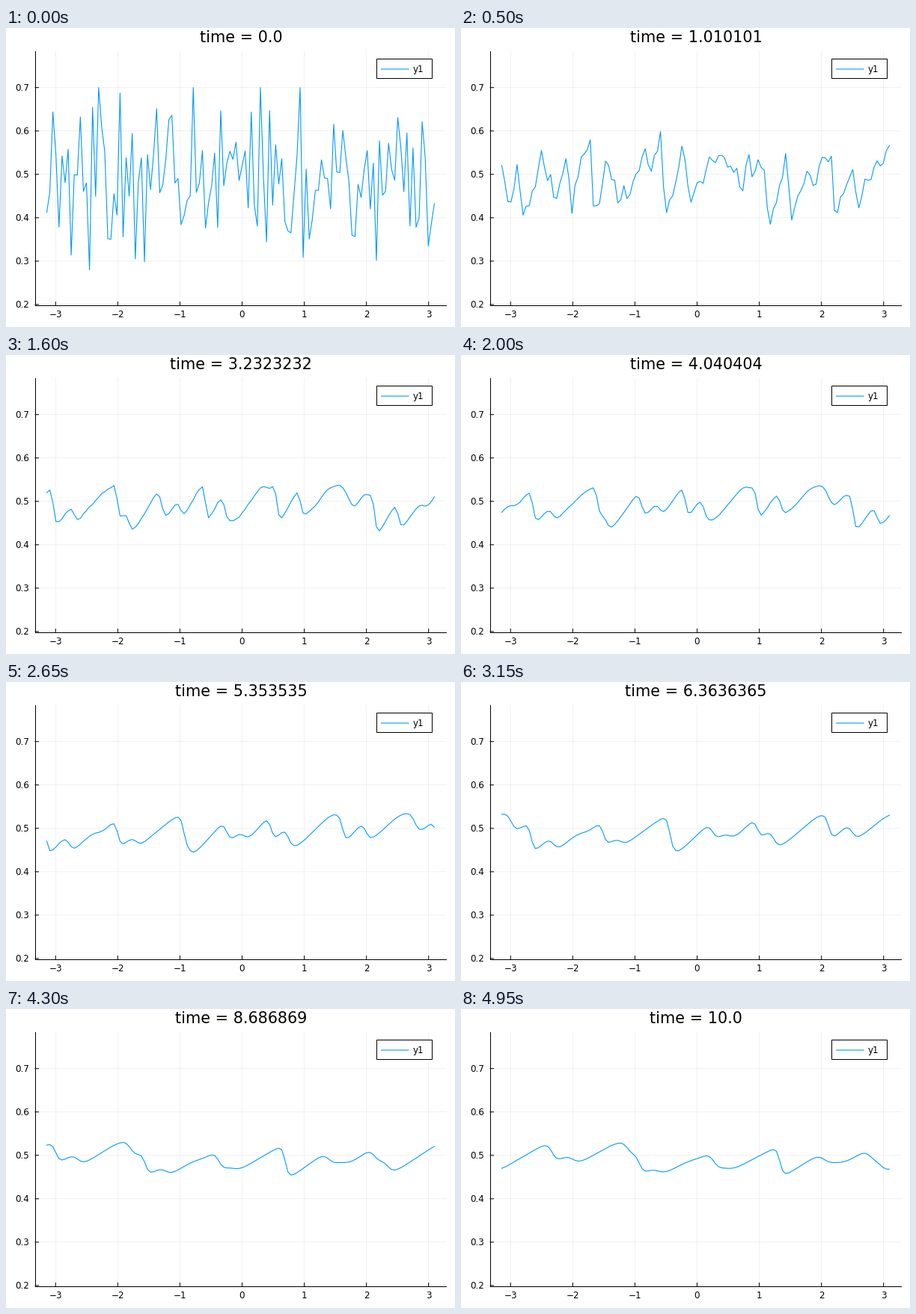
A matplotlib script for the animation above (5000 ms loop, 600 px wide and 400 px high).

```python
import numpy as np
import matplotlib.pyplot as plt
from matplotlib.animation import FuncAnimation
from matplotlib.patches import Rectangle

W, H, DPI = 600, 400, 100
FRAMES, INTERVAL = 100, 50
T_END = 10.0
SUBSTEPS = 5
VISCOSITY = 0.001
BLUE = "#009AFA"
PX = 72 / DPI  # points per pixel

plt.rcParams["font.family"] = "DejaVu Sans"

# Coarse shape of the starting state, in thousandths; noise is added to it
LEVELS = [
    515, 490, 486, 469, 590, 391, 508, 480, 464, 530, 558, 420, 552, 458, 506, 537,
    535, 504, 497, 444, 517, 392, 488, 508, 532, 410, 503, 448, 550, 500, 490, 423,
]
BLOCK = 4
N = BLOCK * len(LEVELS)
x = -np.pi + 2 * np.pi / N * np.arange(N)
k = np.fft.rfftfreq(N, 1 / N)
ik = 1j * k
ik[-1] = 0  # the highest mode has no real derivative


def start_state():
    """Blocks of random values whose means follow the coarse shape."""
    noise = np.random.default_rng(4).normal(0, 0.1, (len(LEVELS), BLOCK))
    noise -= noise.mean(axis=1, keepdims=True)
    u = np.array(LEVELS)[:, None] / 1000 + noise
    return np.clip(u, 0.28, 0.7).ravel()


def advection(v):
    """Spectrum of -u u_x in the form that keeps energy."""
    u = np.fft.irfft(v, N)
    ux = np.fft.irfft(ik * v, N)
    return -(np.fft.rfft(u * ux) + ik * np.fft.rfft(u * u)) / 3


def step(v, dt):
    """Fourth-order Runge-Kutta step with exact diffusion."""
    half = np.exp(-VISCOSITY * k ** 2 * dt / 2)
    full = half ** 2
    a = advection(v)
    b = advection(half * (v + dt / 2 * a))
    c = advection(half * v + dt / 2 * b)
    d = advection(full * v + dt * half * c)
    return full * v + dt / 6 * (full * a + 2 * half * (b + c) + d)


def solve():
    v = np.fft.rfft(start_state())
    states = [np.fft.irfft(v, N)]
    dt = T_END / (FRAMES - 1) / SUBSTEPS
    for _ in range(FRAMES - 1):
        for _ in range(SUBSTEPS):
            v = step(v, dt)
        states.append(np.fft.irfft(v, N))
    return states


def px(v):
    return 315.5 + 83.08 * v


def py(v):
    return 195.8 - 580.5 * (v - 0.5)


states = solve()

fig = plt.figure(figsize=(W / DPI, H / DPI), dpi=DPI, facecolor="white")
ax = fig.add_axes([0, 0, 1, 1])
ax.set_xlim(0, W)
ax.set_ylim(H, 0)
ax.axis("off")

LEFT, RIGHT, TOP, BOTTOM = 39, 588, 31, 371


def stroke(xs, ys, color="black", width=1.0, **kw):
    return ax.plot(xs, ys, color=color, lw=width * PX, **kw)[0]


def grid_line(xs, ys):
    stroke(xs, ys, alpha=0.1, width=0.55, zorder=1, snap=False)


def label(tx, ty, s, size=11.9, **kw):
    return ax.text(tx, ty, s, fontsize=size * PX, va="baseline", **kw)


for v in range(-3, 4):
    gx = px(v)
    grid_line([gx, gx], [TOP, BOTTOM])
    stroke([gx, gx], [BOTTOM - 4.5, BOTTOM], zorder=4, snap=False)
    label(gx, 387, str(v).replace("-", "\u2212"), ha="center")

for v in np.arange(2, 8) / 10:
    gy = py(v)
    grid_line([LEFT, RIGHT], [gy, gy])
    stroke([LEFT, LEFT + 4.5], [gy, gy], zorder=4, snap=False)
    label(31.3, gy + 4.4, f"{v:.1f}", ha="right")

stroke([LEFT, RIGHT], [BOTTOM, BOTTOM], zorder=4)
stroke([LEFT, LEFT], [TOP, BOTTOM], zorder=4)

curve = stroke(px(x), py(states[0]), BLUE, 1.1, zorder=3, solid_joinstyle="round")

ax.add_patch(Rectangle((495, 41), 74, 26, fc="white", ec="black", lw=PX, zorder=5))
stroke([501.5, 538], [55, 55], BLUE, 1.1, zorder=6, snap=False)
label(544, 59.3, "y1", zorder=6)

title = label((LEFT + RIGHT) / 2 + 0.5, 19, "", 20.8, ha="center")


def draw(n):
    curve.set_ydata(py(states[n]))
    title.set_text("time = " + str(np.float32(T_END * n / (FRAMES - 1))))
    return curve, title


anim = FuncAnimation(fig, draw, frames=FRAMES, interval=INTERVAL,
                     repeat=True, repeat_delay=0, blit=False)
plt.show()
```
